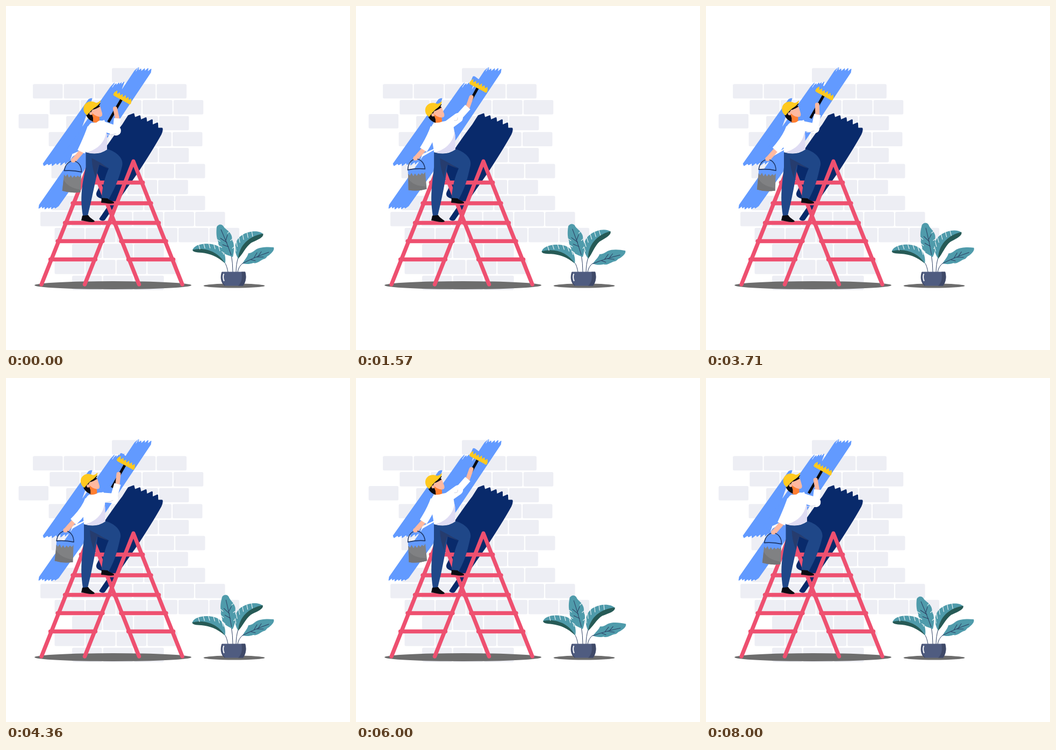
An HTML page that plays this animation: 640 by 640 pixels, repeating every 8.07 s.

```html
<!DOCTYPE html>
<html lang="en">
<head>
<meta charset="utf-8">
<title>Wall painter</title>
<style>
html, body { margin: 0; width: 100%; height: 100%; overflow: hidden; background: #fff; }
svg { display: block; width: 100vw; height: 100vh; }
.line { fill: none; }
.white { stroke: #fff; }
.skin { fill: #ffb9a0; }
.teal { fill: #4f9bab; }
.deep { fill: #265a56; }
.sky { fill: #629aff; }
.navy { fill: #092a6b; }
.black { fill: #0a0b12; }
.gold { fill: #ffc91f; }
.vein { fill: none; stroke: #2c3f63; stroke-width: 1; stroke-linecap: round; }
.slit { fill: none; stroke: #fff; stroke-width: 1; stroke-linecap: round; }
#light { stroke: #629aff; stroke-width: 1.5; stroke-linejoin: round; }
#dark { stroke: #092a6b; stroke-width: 3; stroke-linejoin: round; }
</style>
</head>
<body>
<svg viewBox="0 0 640 640">
  <g id="bricks" fill="#edeef4"></g>
  <path id="light" class="sky"/>
  <path class="slit" stroke-width="2" d="M198 151L203 143M242 121L246 115M103 302L116 290"/>
  <path id="dark" class="navy"/>

  <ellipse cx="199" cy="519.5" rx="146" ry="7.5" fill="#6d6d6d"/>
  <ellipse cx="424.5" cy="520.5" rx="57" ry="4" fill="#6d6d6d"/>
  <g id="ladder" class="line" stroke="#ee5070" stroke-width="7.4" stroke-linecap="round" stroke-linejoin="round"></g>

  <!-- Plant -->
  <path class="vein" d="M408 479Q411 484 413 495M419 462Q422 478 422 495M432 468Q428 480 428 495M440 479Q433 484 431 495"/>
  <g id="leaf0">
    <path class="teal" d="M348 453C350 443 370 438 390 444C405 449 411 464 408 479C397 462 376 448 348 453Z"/>
    <path class="deep" d="M348 452C372 447 396 457 408 479C393 465 380 460 365 458C354 457 348 456 348 452Z"/>
  </g>
  <g id="leaf1">
    <path class="teal" d="M392 411C395 406 400 405 404 409C407 415 414 417 418 424C422 430 419 434 423 440C425 449 424 459 422 467
      C415 464 404 462 400 455C400 450 394 445 395 439C391 431 391 420 392 411Z"/>
    <path class="vein" d="M400 416Q410 438 419 463M411 440L399 432M414 448L403 444M409 436L412 426"/>
  </g>
  <g id="leaf2">
    <path class="teal" d="M477 423C470 416 451 417 438 426C425 434 421 453 432 470C437 447 452 429 477 423Z"/>
    <path class="deep" d="M477 422C451 427 433 445 432 470C440 462 445 448 455 440C464 435 475 431 477 425Z"/>
  </g>
  <g id="leaf3">
    <path class="teal" d="M440 479C444 472 449 467 451 460C457 460 461 456 465 453C474 448 487 448 498 449C500 454 495 459 489 464
      C484 466 485 470 479 471C472 474 467 480 460 478C452 481 446 480 440 479Z"/>
    <path class="vein" d="M440 479Q461 468 489 458M461 469L467 459M469 466L475 457M456 472L464 474M466 467L479 467"/>
  </g>
  <path fill="#4f5c80" d="M402 494.5H445C448 504 446 514 441 520.5H407C399 514 399 504 402 494.5Z"/>
  <path fill="#3f4968" d="M438 494.5H445C448 504 446 514 441 520.5H432C439 514 440 504 438 494.5Z"/>
  <path class="line" stroke="#3f4968" stroke-width="1.5" d="M402 495C399 504 400 514 407 520"/>
  <path class="line white" stroke-width="2" stroke-linecap="round" d="M405 499Q403 505 405.5 511"/>

  <!-- Painter -->
  <g id="roller">
    <path class="sky" d="M-18 -11Q-17 -14 -13 -13L10 -9V0H-17Z"/>
    <path class="line" stroke="#0a0b12" stroke-width="5" d="M0 0L-1 52"/>
    <path id="bristles" class="gold"/>
  </g>
  <path id="pants" fill="#1f4788"/>
  <path id="crease" fill="#263c6e"/>
  <path class="black" d="M142 390L153 389C157 396 165 398 165 401C160 404 148 400 140 399Z"/>
  <path class="black" d="M178 357L189 358C194 363 202 363 201 367C192 369 184 366 177 366Z"/>
  <g id="head">
    <path fill="#ff7f32" d="M156 197L168 197L174 207V216Q167 219 160 215Z"/>
    <path class="black" d="M149 203L158 195L162 208V215Q153 212 149 203Z"/>
    <path class="skin" d="M159 194L175 186Q177 193 179 200Q180 207 173 206Q165 205 159 197Z"/>
    <path class="black" d="M153 203C158 193 168 182 176 181L173 185L175 187Q167 192 161 193Q158 199 153 203Z"/>
    <circle class="skin" cx="158" cy="200" r="2.8"/>
    <path class="gold" d="M151 203C143 199 141 185 151 179.5C157 176 164 178 167 180C171 180 173 178 176 175.5
      C176 181 172 184 167 188C160 192 156 197 151 203Z"/>
  </g>
  <path id="forearm" class="line" stroke="#ffb9a0" stroke-width="9" stroke-linecap="round"/>
  <path id="torso" fill="#fff"/>
  <path id="shade" fill="#dfdcf3"/>
  <path id="reach" class="line" stroke="#ffb9a0" stroke-width="8" stroke-linecap="round"/>
  <path id="upper" class="line white" stroke-width="18" stroke-linecap="round"/>
  <path id="cuff" class="line white" stroke-width="12.5"/>
  <path id="fold" class="line" stroke="#dfdfe8" stroke-width="1.3" stroke-linecap="round"/>
  <path id="sleeve" class="line white" stroke-width="15"/>
  <g id="bucket">
    <path class="line" stroke="#1d3564" stroke-width="1.5" d="M-16 19C-14 -6 14 -6 16 19"/>
    <path class="sky" d="M-16 19H16V34H-16Z"/>
    <path id="drips" fill="#808183"/>
    <path fill="#747577" d="M-16 36Q-8 50 15 52L17 57Q0 61 -17 57Z"/>
    <path class="line" stroke="#1d3564" stroke-width="1.8" stroke-linecap="round" d="M-16 19.5Q0 17 16 19.5"/>
  </g>
  <circle id="fist" class="skin" r="4"/>
</svg>
<script>
const LOOP = 8070, STEP = LOOP / 113, STROKE = LOOP / 2, TURN = 2 * Math.PI;
const $ = id => document.getElementById(id);
const set = (id, d) => $(id).setAttribute('d', d);
const move = (id, value) => $(id).setAttribute('transform', value);
const mix = (a, b, k) => a.map((v, i) => v + (b[i] - v) * k);

let seed = 7;
const random = () => (seed = seed * 16807 % 2147483647) / 2147483647;

// Ragged edge from a to b, teeth pointing along the brush direction
function ragged(a, b, teeth, depth, dir = [.55, -.83]) {
  return Array.from({ length: teeth * 2 + 1 }, (_, i) => {
    const [x, y] = mix(a, b, i / (teeth * 2));
    const reach = (i % 2 ? .4 + .6 * random() : -.4 * random()) * depth;
    return `${x + dir[0] * reach} ${y + dir[1] * reach}`;
  }).join('L');
}

// Wall: first left edge and brick count, row by row from the top
const rows = [[197, 1], [50, 5], [81.3, 5], [112, 4], [79.5, 5], [227, 2], [84.5, 5], [168, 3],
  [84.5, 5], [64, 6], [90.5, 6], [123, 3], [90.5, 4], [123, 3]];
const brick = (x, y) => `<rect x="${x}" y="${y}" width="55.5" height="26.7" rx="2.5"/>`;
$('bricks').innerHTML = brick(23.5, 201) + rows.map(([x, n], row) =>
  Array.from({ length: n }, (_, i) => brick(x + i * 57.6, 115.5 + row * 29.72)).join('')).join('');

// Overlapping brush strokes: top left, top right, bottom right, bottom left
const strokes = [
  [[240, 120], [270, 122], [187, 246], [160, 240]],
  [[196, 149], [218, 147], [187, 246], [100, 285]],
  [[154, 174], [160, 172], [117, 290], [69, 294]],
  [[125, 280], [187, 246], [96, 374], [61, 372]]
];
set('light', strokes.map(([a, b, c, d], i) => `M${ragged(a, b, i < 2 ? 5 : 1, i < 2 ? 7 : 1)}`
  + (i < 2 ? `L${c}L${d}Z` : `L${ragged(c, d, 6, -6)}Z`)).join(''));

set('dark', `M${ragged([229, 203], [284, 225], 5, 10)}L290 228Q291 231 288 238Q272 267 243 311L183 397Q179 400 175 396
  L190 374L178 357Q167 354 170 347L175 337L160 308L184 268Q204 239 217 222Z`);

// Two crossing A-frames joined by rungs
const rungs = [328.5, 367, 403.5, 437.5, 471.5].map(y => {
  const d = (y - 289) * 91 / 229;
  return `M${155 - d} ${y}H${239 - d}M${155 + d} ${y}H${239 + d}`;
}).join('');
$('ladder').innerHTML =
  `<path d="${rungs}"/><path d="M66 518L157 289L247.5 518M146.5 518L237 289L328 518"/>`;

set('bristles', `M-18 3L${ragged([-18, -3], [18, -3], 6, 5, [0, -1])}L19 2Q18 5 14 4H-15Z`);
set('drips', `M${ragged([-16, 27], [16, 27], 5, 5, [0, 1])}L17 57Q0 61 -17 57Z`);

// Cuts spread along part of a leaf's outline
function slits(id, from, to, count, dx, dy) {
  const leaf = $(id), edge = leaf.querySelector('.teal'), size = edge.getTotalLength();
  let d = '';
  for (let i = 0; i < count; i++) {
    const p = edge.getPointAtLength(size * (from + (to - from) * i / (count - 1)));
    d += `M${p.x} ${p.y}l${dx} ${dy}`;
  }
  leaf.insertAdjacentHTML('beforeend', `<path class="slit" d="${d}"/>`);
}
slits('leaf0', .1, .4, 6, 2, 8);
slits('leaf1', .2, .4, 3, -3, 3);
slits('leaf1', .68, .84, 3, 5, 3);
slits('leaf2', .14, .42, 6, 2, 9);

// Soft pulse around a moment of the loop
function pulse(t, center, width) {
  const gap = Math.abs(t - center), near = Math.min(gap, LOOP - gap);
  return Math.exp(-((near / width) ** 2));
}

// Arm goes up with easing, rests, then sinks evenly
function lift(p) {
  if (p < .36) return Math.sin(p / .36 * Math.PI / 2);
  return Math.min(1, (1 - p) / .52);
}

function drawPlant(t) {
  const wave = start => Math.cos((t - start) / LOOP * TURN);
  const nod = Math.abs(Math.sin(Math.PI * (t / STROKE - .04))) ** 3;
  move('leaf0', `rotate(${-2.2 + 2.4 * wave(6500)} 411 490)`);
  move('leaf1', `rotate(${5.2 - 5.2 * wave(100)} 421 466)`);
  move('leaf2', `rotate(${.7 + 5.5 * wave(6300)} 432 470)`);
  move('leaf3', `rotate(${8 * nod} 436 484)`);
}

function drawPainter(t) {
  const p = t % STROKE / STROKE, s = lift(p), far = 1 - (1 - s) ** 2;
  const [rx, ry] = mix([216.5, 171], [228, 149.5], far);
  const [ex, ey] = mix([205, 232], [190, 208], s);
  const [cx, cy] = mix([207, 209], [208, 188], far);
  const seam = pulse(t, 8000, 900);
  const drift = 15 * seam - 18 * pulse(t, 900, 350) + 9 * pulse(t, 3000, 750);
  const bx = 111 + drift, by = 284.5 + drift * .25;
  const w = 3.5 * seam, l = 145 + w, r = 184.5 + w;
  const nx = 166 - 13 * s, sx = 183 - 5 * s;

  move('roller', `translate(${rx} ${ry}) rotate(${29 - s})`);
  move('head', `translate(${-14 * s} ${2 * s}) rotate(${-4 * s} 166 212)`);
  move('bucket', `translate(${bx} ${by}) rotate(${4.3 * Math.cos(p * TURN)})`);
  move('fist', `translate(${bx - 1} ${by - 1})`);

  set('pants', `M${l} 270L${r} 266C${r + 18} 271 ${r + 32} 284 ${r + 28} 298C${r + 24} 315 205 335 191 360
    L178 357C179 337 184 318 191 302L${l + 26} 292C167 320 162 350 152 390L143 390C137 355 142 330 ${l} 300Z`);
  set('crease', `M${l + 11} 283L${l + 28} 292L191 303L${l + 25} 295Q${l + 19} 310 ${l + 19} 320Q${l + 12} 305 ${l + 11} 283Z`);
  set('torso', `M${nx - 7} 217C${nx - 19} 225 ${l - 3} 248 ${l} 272Q${l + 23} 279 ${r} 267L${r - .5} 240
    L${sx + 3} 222L${sx} 212L${nx + 8} 215Q${nx} 218 ${nx - 7} 217Z`);
  set('shade', `M${l + 2} 272C${l + 23} 267 ${l + 36} 252 ${l + 38} 234L${r} 240V267Q${l + 21} 278 ${l + 2} 272Z`);
  set('upper', `M${sx - 7} 222L${ex} ${ey}`);
  set('cuff', `M${ex} ${ey}L${cx} ${cy}`);
  set('fold', `M${sx + 5} ${240 - 27 * s}Q${sx + 12} ${240 - 26 * s} ${ex - 1} ${ey + 6 - 6 * s}`);
  set('reach', `M${cx} ${cy}L${rx - 13.5} ${ry + 20}`);

  const fx = bx + 15, fy = by - 18;
  set('sleeve', `M${nx - 7} 226Q${nx - 14} 246 ${fx - 1} ${fy + 1}`);
  set('forearm', `M${fx} ${fy}L${bx + 1} ${by - 2}`);
}

function frame(now) {
  const t = Math.floor((now % LOOP + 2) / STEP) * STEP % LOOP;
  drawPlant(t);
  drawPainter(t);
  requestAnimationFrame(frame);
}
frame(performance.now());
</script>
</body>
</html>
```
